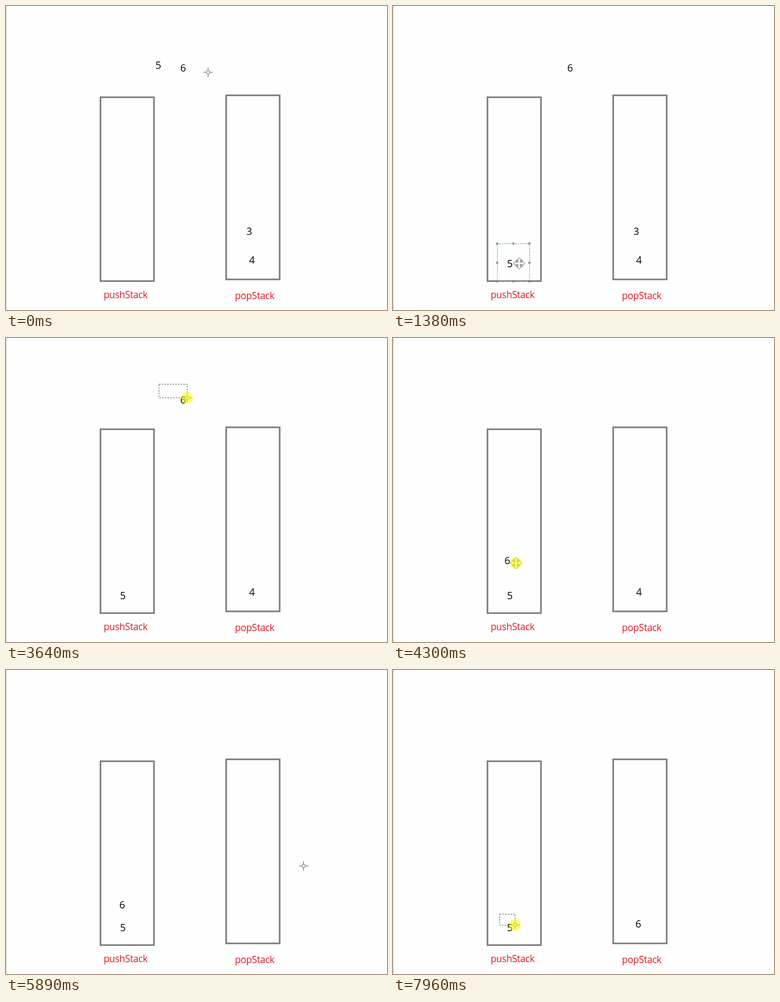
These frames come from a looping animation (838 px wide and 668 px high, 7990 ms). An HTML page:

```html
<!DOCTYPE html>
<html lang="en">
<head>
<meta charset="utf-8">
<title>Two stacks as a queue</title>
<style>
html, body { margin: 0; width: 100%; height: 100%; overflow: hidden; background: #fefefe; }
svg { display: block; width: 838px; height: 668px; }
text { font-family: "Open Sans", "Noto Sans", sans-serif; text-anchor: middle; }
.num { font-size: 22px; fill: #0c0000; }
.label { font-size: 21px; letter-spacing: -0.4px; fill: #e51a24; }
.stack { fill: none; stroke: #7f7f7f; stroke-width: 3.6; }
.sel { fill: none; stroke-width: 1; }
.handle { fill: #fff; stroke: #444; stroke-width: 1; }
</style>
</head>
<body>
<svg viewBox="0 0 838 668">
  <path d="M.5 0V668" stroke="#c9c9c9"/>
  <rect class="stack" x="207.8" y="200.5" width="117.6" height="404"/>
  <rect class="stack" x="484.3" y="196.3" width="117.6" height="404.4"/>
  <text class="label" x="263" y="642">pushStack</text>
  <text class="label" x="547" y="643.5">popStack</text>
  <g id="nums"></g>
  <g id="box">
    <path class="sel" id="under" stroke="#fff"/>
    <path class="sel" id="dash"/>
    <g id="handles"></g>
  </g>
  <g id="cursor">
    <g id="cross" fill="none" stroke="#444" stroke-width="1">
      <path d="M-10.5 0H-4M4 0H10.5M0 -10.5V-4M0 4V10.5"/>
      <circle r="3.8" fill="#fff"/>
      <path d="M-.5 0H.5" stroke="#999"/>
    </g>
    <path id="arrows" fill="#fff" stroke="#333" stroke-width="1"/>
    <circle id="press" r="12.8" fill="#ff0" opacity=".55"/>
  </g>
</svg>
<script>
const LOOP = 7990, W = 838, HOLD = 30;
const $ = id => document.getElementById(id);
const homes = { 3: [535, 495], 4: [541, 558], 5: [335, 130], 6: [389.5, 136] };

// Select from one corner to the other, then grip and drag along ride.
// Points of via and ride are [time, x, y].
const gestures = [
  { num: 5, a: 400, b: 670, grab: 820, drop: 1380,
    from: [307, 86], to: [378, 169], grip: [355, 130],
    ride: [[980, 300, 325], [1040, 278, 450], [1200, 277, 566]] },
  { num: 3, a: 2050, b: 2330, grab: 2560, drop: 2890, via: [1780, 606, 352],
    from: [521, 461], to: [587, 528], grip: [554, 486],
    ride: [[2770, 597, 377], [2830, 725, 257], [2890, 900, 190]] },
  { num: 6, a: 3540, b: 3740, grab: 3890, drop: 4460, via: [3220, 772, 211],
    from: [336, 101], to: [458, 160], grip: [408, 141],
    ride: [[4050, 345, 228], [4300, 270, 494], [4400, 274, 521]] },
  { num: 4, a: 4840, b: 5130, grab: 5380, drop: 5660, via: [4640, 400, 540],
    from: [513, 515], to: [575, 588], grip: [562, 556],
    ride: [[5570, 625, 420], [5600, 700, 381], [5630, 799, 350], [5660, 900, 320]] },
  { num: 6, a: 6240, b: 6470, grab: 6690, drop: 7540, via: [5890, 657, 430],
    from: [229, 484], to: [295, 548], grip: [275, 521],
    ride: [[6810, 362, 474], [7000, 440, 476], [7300, 559, 563]] },
  { num: 5, a: 7790, b: LOOP + HOLD, grab: Infinity, drop: Infinity,
    from: [234, 536], to: [271, 563] }
];

// Pointer keys with short rests around every press and release
const path = [];
const key = (t, p) => path.push([t, ...p]);
const rest = (t, p) => { key(t - HOLD, p); key(t + HOLD, p); };
const wait = t => key(t, path[path.length - 1].slice(1));
key(0, [444, 145]);
wait(80);
for (const g of gestures) {
  if (g.via) {
    if (path[path.length - 1][1] > W) wait(g.via[0] - 1);
    path.push(g.via);
  }
  rest(g.a, g.from);
  rest(g.b, g.to);
  if (!g.ride) continue;
  rest(g.grab, g.grip);
  path.push(...g.ride);
  if (g.drop > path[path.length - 1][0]) wait(g.drop);
}

function slope(i, c) {
  return (path[i + 1][c] - path[i][c]) / (path[i + 1][0] - path[i][0]);
}

// Monotone tangent: smooth motion without overshoot
function tangent(i, c) {
  if (i === 0 || i === path.length - 1) return 0;
  const p = slope(i - 1, c), q = slope(i, c);
  return p * q <= 0 ? 0 : 2 * p * q / (p + q);
}

function pointer(t) {
  let i = 0;
  while (i < path.length - 2 && path[i + 1][0] <= t) i++;
  const h = path[i + 1][0] - path[i][0];
  const u = Math.min(1, (t - path[i][0]) / h), v = 1 - u;
  return [1, 2].map(c =>
    path[i][c] * v * v * (1 + 2 * u) + path[i + 1][c] * u * u * (3 - 2 * u) +
    h * u * v * (tangent(i, c) * v - tangent(i + 1, c) * u));
}

function make(tag, parent, attrs) {
  const el = document.createElementNS('http://www.w3.org/2000/svg', tag);
  for (const k in attrs) el.setAttribute(k, attrs[k]);
  return parent.appendChild(el);
}

const nums = {};
for (const n in homes) {
  nums[n] = make('text', $('nums'), { class: 'num' });
  nums[n].textContent = n;
}
const handles = Array.from({ length: 8 }, () =>
  make('rect', $('handles'), { class: 'handle', width: 3, height: 3 }));

const arm = [[-2.5, -2.5], [-2.5, -6.5], [-6, -6.5], [0, -12.5], [6, -6.5], [2.5, -6.5]];
const turn = ([x, y], n) => n ? turn([-y, x], n - 1) : [x, y];
$('arrows').setAttribute('d',
  'M' + [0, 1, 2, 3].flatMap(n => arm.map(p => turn(p, n))).join('L') + 'Z');

const show = (el, on) => el.setAttribute('visibility', on ? 'inherit' : 'hidden');

function shift(g, t) {
  if (t < g.grab) return [0, 0];
  const [x, y] = pointer(Math.min(t, g.drop));
  return [x - g.grip[0], y - g.grip[1]];
}

function drawBox(corners, done) {
  const [x1, y1, x2, y2] = corners.map(v => Math.floor(v) + 0.5);
  const d = `M${x1} ${y1}H${x2}V${y2}H${x1}Z`;
  $('under').setAttribute('d', d);
  $('dash').setAttribute('d', d);
  $('dash').setAttribute('stroke', done ? '#1c86d9' : '#222');
  $('dash').setAttribute('stroke-dasharray', done ? '3 2' : '3 3');
  show($('handles'), done);
  handles.forEach((el, i) => {
    const spot = i < 4 ? i : i + 1;
    const col = spot % 3, row = Math.floor(spot / 3);
    el.setAttribute('x', Math.floor(x1 + (x2 - x1) * col / 2) - 1.5);
    el.setAttribute('y', Math.floor(y1 + (y2 - y1) * row / 2) - 1.5);
  });
}

function render(t) {
  const [px, py] = pointer(t);
  const g = gestures.filter(e => e.a <= t).pop();

  for (const n in homes) {
    let [x, y] = homes[n];
    for (const e of gestures.filter(e => e.num == n)) {
      const [dx, dy] = shift(e, t);
      x += dx;
      y += dy;
    }
    nums[n].setAttribute('x', x);
    nums[n].setAttribute('y', y + 8);
  }

  let pressed = false, move = false, boxed = false;
  if (g) {
    const selecting = t < g.b, dragging = t >= g.grab && t < g.drop;
    const [dx, dy] = shift(g, t);
    const [ex, ey] = selecting ? [px, py] : g.to;
    const x1 = g.from[0] + dx, y1 = g.from[1] + dy, x2 = ex + dx, y2 = ey + dy;
    pressed = selecting || dragging;
    boxed = !dragging && x1 < W && x2 - x1 > 1;
    if (boxed) drawBox([x1, y1, x2, y2], !selecting);
    const inside = px > x1 && px < x2 - 2 && py > y1 && py < y2 - 2;
    move = dragging || (!selecting && inside);
  }
  show($('box'), boxed);
  if (!boxed) show($('handles'), false);
  show($('arrows'), move);
  show($('cross'), !move);
  show($('press'), pressed);
  $('cursor').setAttribute('transform',
    `translate(${Math.floor(px) + 0.5} ${Math.floor(py) + 0.5})`);
}

const start = performance.now();
function tick() {
  render((performance.now() - start) % LOOP);
  requestAnimationFrame(tick);
}
render(0);
requestAnimationFrame(tick);
</script>
</body>
</html>
```
